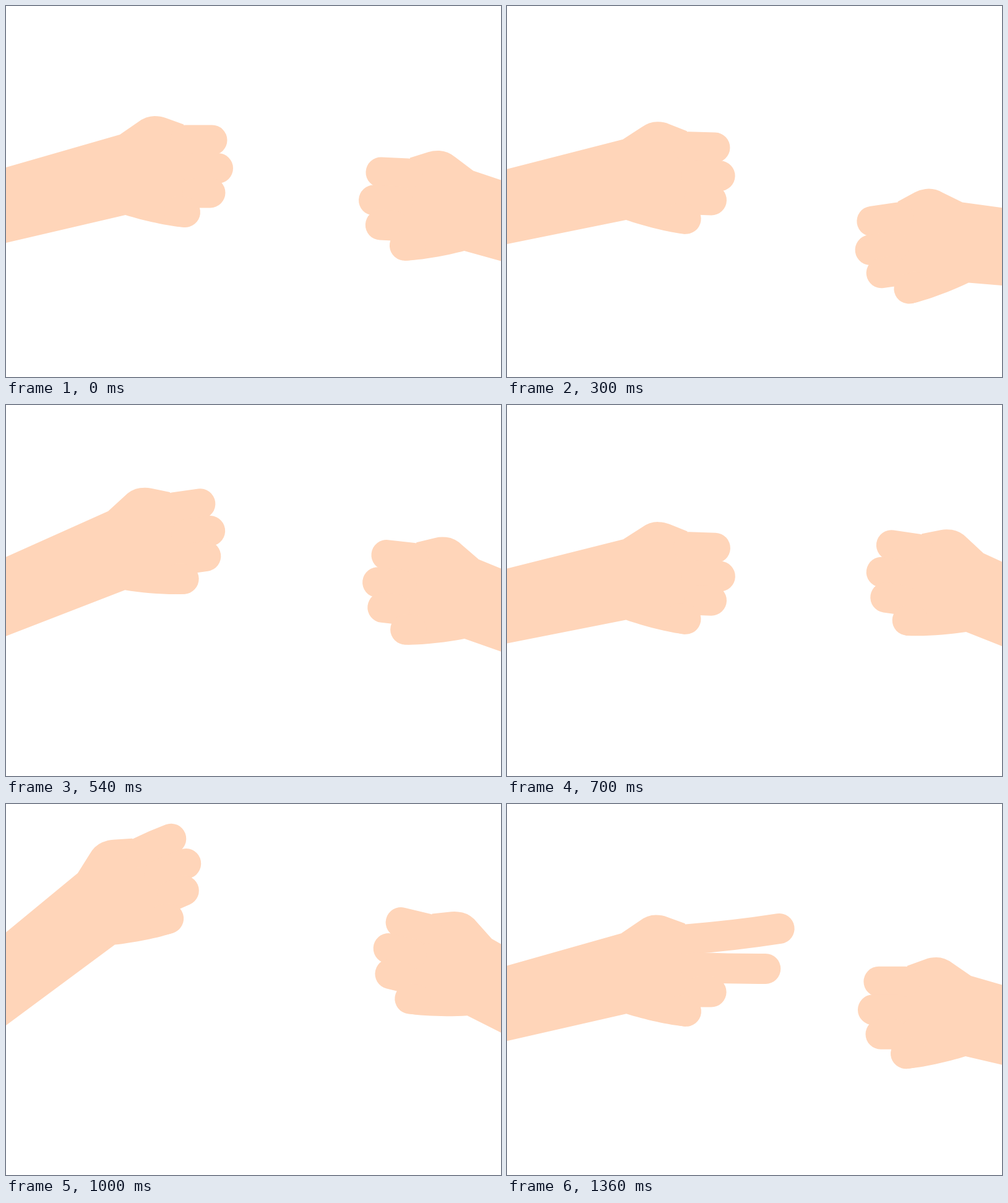
An HTML page with a canvas that plays this animation: 800x600 px, repeating every 1.38 s.

```html
<!DOCTYPE html>
<html lang="en">
<head>
<meta charset="utf-8">
<title>Rock paper scissors</title>
<style>
  html, body { margin: 0; width: 100%; height: 100%; overflow: hidden; background: #fff; }
  canvas { display: block; }
</style>
</head>
<body>
<canvas id="stage" width="800" height="600"></canvas>
<script>
const ctx = document.getElementById('stage').getContext('2d');
const SKIN = '#ffd5b9';
const LOOP = 1380, TICK = 20;
const FINGER = 49;
const ELBOW = { x: -82, y: 324 };
const TOP = -24.7;

// Times in ticks, angles in degrees, positive is down
const left = { peak: 8.4, beat: 8.5, from: 0, lift: -9.1, dip: 3.1, drop: 48.5, fall: 10.8, land: 2.7 };
const right = { peak: 7.3, beat: 7.9, from: -2.2, lift: -20.2, dip: 8.4, drop: 44, fall: 14, land: 3.6 };

// Root, curled and full length; tip rise while bent and when straight; bow of the bend
const index = { x: 290, y: 217, curl: 43, reach: 149.5, bent: 1.5, rise: 18, bow: 12 };
const middle = { x: 304, y: 262.5, curl: 38.5, reach: 113.5, bent: -6, rise: -1.5, bow: 5 };

const wave = p => (1 - Math.cos(Math.PI * p)) / 2;
const ease = p => wave(Math.min(1, Math.max(0, p)));
const mix = (a, b, p) => a + (b - a) * p;

// Two small pumps, a high third one, then the throw and a short settle
function swing(hand, tick) {
  const beats = Math.min(4, (tick - hand.peak) / hand.beat);
  const high = beats < 3 ? hand.lift : TOP;
  const low = beats < 0 ? hand.from : hand.dip;
  const pump = mix(high, low, wave(beats));
  const thrown = ease((tick - hand.drop) / hand.fall);
  const settled = ease((tick - hand.drop - hand.fall) / 11);
  return mix(mix(pump, hand.land, thrown), 0, settled);
}

function stroke(x0, y0, cx, cy, x1, y1) {
  ctx.beginPath();
  ctx.moveTo(x0, y0);
  ctx.quadraticCurveTo(cx, cy, x1, y1);
  ctx.stroke();
}

function drawFinger(f, open, stretch) {
  const length = mix(f.curl, f.reach * mix(0.9, 1, stretch), open);
  const rise = mix(f.bent, f.rise, stretch) * open;
  const bow = mix(f.bow, -f.bow / 4, stretch) * open;
  stroke(f.x, f.y, f.x + length / 2, f.y - rise / 2 - bow, f.x + length, f.y - rise);
}

function drawHand(angle, open, stretch) {
  ctx.translate(ELBOW.x, ELBOW.y);
  ctx.rotate(angle * Math.PI / 180);
  ctx.translate(-ELBOW.x, -ELBOW.y);

  // Forearm, knuckle and palm
  ctx.beginPath();
  ctx.moveTo(-150, 304.2);
  ctx.lineTo(184, 208);
  ctx.lineTo(213, 188);
  ctx.quadraticCurveTo(226, 178, 240, 178);
  ctx.quadraticCurveTo(250, 178, 258, 181);
  ctx.lineTo(287, 191.5);
  ctx.lineTo(302, 240);
  ctx.lineTo(312, 327);
  ctx.lineTo(289, 358);
  ctx.bezierCurveTo(262, 356, 222, 347, 193, 338);
  ctx.lineTo(-150, 418);
  ctx.fill();

  drawFinger(index, open, stretch);
  drawFinger(middle, open, stretch);
  stroke(310, 302, 320, 302, 330, 302);
  stroke(280, 332, 285, 333, 289.5, 333.5);
}

function render(now) {
  const tick = Math.floor((now % LOOP) / TICK);
  ctx.fillStyle = '#fff';
  ctx.fillRect(0, 0, 800, 600);
  ctx.fillStyle = ctx.strokeStyle = SKIN;
  ctx.lineWidth = FINGER;
  ctx.lineCap = 'round';

  ctx.save();
  drawHand(swing(left, tick), ease((tick - 48.5) / 6.5), ease((tick - 56) / 9));
  ctx.restore();

  ctx.save();
  ctx.translate(934, 69.7);
  ctx.scale(-1, 1);
  drawHand(swing(right, tick), 0, 0);
  ctx.restore();
}

const start = performance.now();
function loop() {
  render(performance.now() - start);
  requestAnimationFrame(loop);
}
loop();
</script>
</body>
</html>
```
